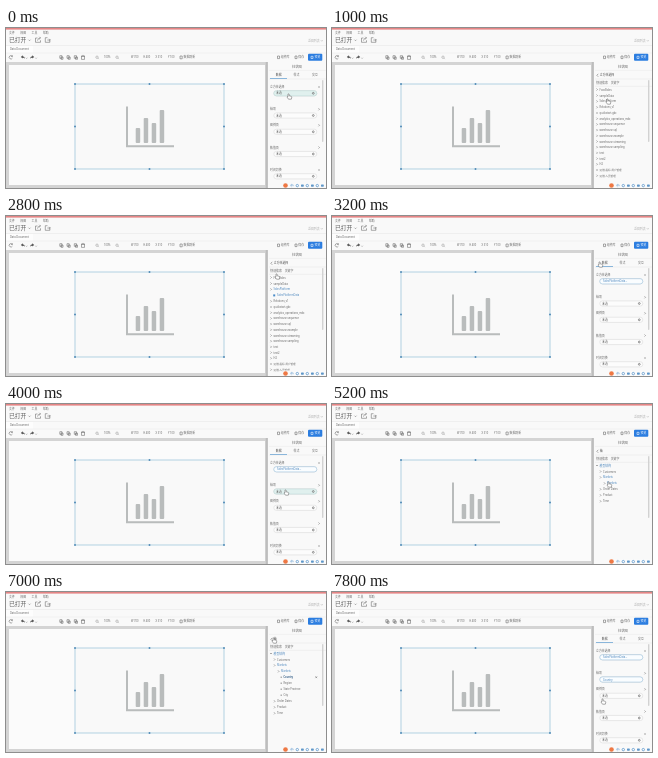
Animation of 320x160 px, one loop 8 s. Source, as an HTML page:

```html
<!DOCTYPE html>
<html lang="en">
<head>
<meta charset="utf-8">
<title>Chart data binding</title>
<style>
html, body { margin: 0; width: 100%; height: 100%; overflow: hidden; background: #f9f9f9; }
svg { display: block; width: 100%; height: 100%; }
text { font-family: "Noto Sans", "Noto Sans CJK SC", "Noto Sans CJK", sans-serif; font-size: 2.9px; fill: #666; dominant-baseline: central; }
.latin { font-size: 2.55px; }
.blue { fill: #4a85bd; }
.line { fill: none; stroke: #666; stroke-width: .55; }
.faint { stroke: #999; }
.rule { stroke: #e4e4e4; stroke-width: .5; }

[class*="at-"] { animation: 8s step-end infinite; }
.at-form { animation-name: form; }
.at-cubes { animation-name: cubes; }
.at-dims { animation-name: dims; }
.at-hover1 { animation-name: hover1; }
.at-hover2 { animation-name: hover2; }
.at-value1 { animation-name: value1; }
.at-value2 { animation-name: value2; }
.at-cube-open { animation-name: cubeOpen; }
.at-cube-shift { animation-name: cubeShift; }
.at-cube-sel text { animation: cubeSel 8s step-end infinite; }
.at-dim-open { animation-name: dimOpen; }
.at-dim-sel text { animation: dimSel 8s step-end infinite; }
.at-level-open { animation-name: levelOpen; }
.at-dim-shift { animation-name: dimShift; }
.at-chosen { animation-name: chosen; }
.at-tip { animation-name: tip; }
.at-cursor { animation-name: cursor; }

@keyframes form { 0%, 40%, 95% { opacity: 1 } 5%, 55% { opacity: 0 } }
@keyframes cubes { 0%, 40% { opacity: 0 } 5% { opacity: 1 } }
@keyframes dims { 0%, 95% { opacity: 0 } 55% { opacity: 1 } }
@keyframes hover1 { 0% { opacity: 1 } 5%, 100% { opacity: 0 } }
@keyframes hover2 { 0%, 55% { opacity: 0 } 50% { opacity: 1 } }
@keyframes value1 { 0% { opacity: 0 } 40% { opacity: 1 } }
@keyframes value2 { 0% { opacity: 0 } 95% { opacity: 1 } }
@keyframes cubeOpen { 0% { opacity: 0 } 17.5% { opacity: 1 } }
@keyframes cubeShift { 0% { transform: none } 17.5%, 100% { transform: translateY(6px) } }
@keyframes cubeSel { 0% { fill: #666 } 17.5%, 100% { fill: #4a85bd } }
@keyframes dimOpen { 0% { opacity: 0 } 60% { opacity: 1 } }
@keyframes dimSel { 0% { fill: #666 } 60%, 100% { fill: #4a85bd } }
@keyframes levelOpen { 0% { opacity: 0 } 70% { opacity: 1 } }
@keyframes dimShift { 0% { transform: none } 60% { transform: translateY(6px) } 70%, 100% { transform: translateY(30px) } }
@keyframes chosen { 0% { opacity: 0 } 75% { opacity: 1 } }
@keyframes tip { 0%, 82.5% { opacity: 0 } 75% { opacity: 1 } }
@keyframes cursor {
  0% { transform: translate(282px, 66px) }
  10% { transform: translate(280px, 68px) }
  12.5% { transform: translate(275px, 71px) }
  15%, 20% { transform: translate(267px, 73px) }
  22.5% { transform: translate(269px, 74px) }
  25%, 30% { transform: translate(277px, 78px) }
  32.5% { transform: translate(275px, 72px) }
  35% { transform: translate(270px, 58px) }
  37.5%, 40% { transform: translate(267px, 46px) }
  42.5% { transform: translate(268px, 52px) }
  45% { transform: translate(273px, 66px) }
  47.5% { transform: translate(277px, 81px) }
  50%, 52.5% { transform: translate(279px, 86px) }
  55% { transform: translate(277px, 84px) }
  57.5% { transform: translate(270px, 76px) }
  60% { transform: translate(267px, 73px) }
  65% { transform: translate(276px, 78px) }
  67.5% { transform: translate(274px, 79px) }
  70% { transform: translate(271px, 79px) }
  72.5% { transform: translate(277px, 83px) }
  75%, 77.5% { transform: translate(280px, 85px) }
  80% { transform: translate(279px, 83px) }
  82.5% { transform: translate(276px, 75px) }
  85% { transform: translate(271px, 60px) }
  87.5%, 95% { transform: translate(267px, 46px) }
  97.5%, 100% { transform: translate(270px, 107px) }
}
</style>
</head>
<body>
<svg id="stage" viewBox="0 0 320 160" preserveAspectRatio="none"></svg>
<script>
const label = (x, y, words, cls = "", style = "") =>
  `<text x="${x}" y="${y}" class="${cls}" style="${style}">${words}</text>`;
const box = (x, y, w, h, fill, extra = "") =>
  `<rect x="${x}" y="${y}" width="${w}" height="${h}" fill="${fill}" ${extra}/>`;
const path = (d, cls = "") => `<path d="${d}" class="line ${cls}"/>`;
const rule = (x, y, end) => `<path d="M${x} ${y}H${end}" class="rule"/>`;
const group = (cls, ...parts) => `<g class="${cls}">${parts.join("")}</g>`;
const latin = (x, y, words, cls = "") => label(x, y, words, "latin " + cls);

const arrow = (x, y, open) =>
  path(open ? `M${x} ${y - .5}l1 1 1-1` : `M${x + .5} ${y - 1}l1 1-1 1`);
const node = (x, y, words, open = false, cls = "") => arrow(x, y, open) + latin(x + 3.6, y, words, cls);

const topBar = () => box(0, 0, 320, 160, "#f9f9f9") + box(0, 0, 320, 1.6, "#e58585")
  + ["文件", "视图", "工具", "帮助"].map((s, i) => label(3 + i * 11.3, 4.7, s)).join("")
  + label(3, 12, "已打开", "", "font-size:5.8px;fill:#555") + path("M22.5 11.7l1 1 1-1")
  + path("M31.5 10h-2v4.3h5v-2M31.5 12.6q.4-2.6 3-2.6m-1.2-1.2 1.2 1.2-1.2 1.2")
  + path("M41.5 9.7h-2.2v4.6h4.6V12.5M41.3 12h3m-1.2-1.2 1.2 1.2-1.2 1.2")
  + label(302, 12.8, "返回列表", "", "fill:#aaa") + path("M315 12.4l.8.8.8-.8", "faint")
  + rule(0, 17.5, 320) + box(0, 18, 27, 7, "#fdfdfd") + latin(4, 21.2, "Data Document")
  + rule(0, 25, 320);

const zoomIcon = x => `<circle cx="${x}" cy="29.2" r="1.2" class="line faint"/>` + path(`M${x + .9} 30.1l1 1`, "faint");
const copyIcon = x => path(`M${x} 27.7h2.2v2.6H${x}zM${x + 1.2} 29h2v2.3h-2z`);

const toolbar = () => path("M6.3 28.3a1.7 1.7 0 1 0 .1 1.8M6.4 27.2v1.3H5.1")
  + '<path d="M14.8 28.9l2-1.6v1q2.2.1 2 2.6-.6-1.2-2-1.1v.7zM28.2 28.9l-2-1.6v1q-2.2.1-2 2.6.6-1.2 2-1.1v.7z" fill="#555"/>'
  + path("M20 29.8l.6.6.6-.6M29.5 29.8l.6.6.6-.6")
  + [53.8, 61, 68.3].map(copyIcon).join("") + path("M75.5 28.2h3v3.2h-3zM75 28.2h4M76.5 27.4h1")
  + zoomIcon(91) + latin(98, 29.4, "100%") + zoomIcon(111)
  + ["W 700", "H 400", "X 310", "Y 100"].map((s, i) => latin(125 + i * 12.3, 29.4, s)).join("")
  + path("M174 28h2.2v2.8H174z") + label(177.5, 29.4, "数据刷新")
  + path("M271.5 28h2v2.6h-2z") + label(274.8, 29.4, "组件库")
  + path("M289 28h2v2.6h-2z") + label(292.3, 29.4, "保存")
  + box(302, 25.8, 14.3, 6.9, "#2b7de0", 'rx="1"')
  + path("M305 28.3h2v2.2h-2z", "white") + label(308.5, 29.2, "预览", "", "fill:#fff");

const workspace = () => {
  const bars = [[129.7, 100], [137.7, 90], [145.7, 95], [153.7, 82]];
  const handles = [69, 143.5, 218].flatMap(x => [56, 98.5, 141].map(y => [x, y]))
    .filter(([x, y]) => x !== 143.5 || y !== 98.5);
  return box(0, 34, 262, 126, "#d4d4d4") + box(3, 37, 256, 120, "#fbfbfb")
    + box(259.7, 34, 2, 126, "#bdbdbd")
    + box(69, 56, 149, 85, "#f9f9f9", 'stroke="#93bfd8" stroke-width=".7"')
    + handles.map(([x, y]) => box(x - .8, y - .8, 1.6, 1.6, "#3f7eae")).join("")
    + '<path d="M121 78.5V118.3H168" fill="none" stroke="#b9bcbc" stroke-width="2"/>'
    + bars.map(([x, y]) => box(x, y, 4.5, 115 - y, "#b9bcbc", 'rx="1"')).join("");
};

const gear = y => `<circle cx="307.3" cy="${y}" r=".9" fill="none" stroke="#777" stroke-width=".8"/>`;
const pill = (y, stroke, fill) =>
  box(267.8, y - 2.6, 43, 5.2, fill, `rx="2.6" stroke="${stroke}" stroke-width=".5"`);
const filled = (y, words) => pill(y, "#8ab6d6", "#fafdff") + latin(271, y, words, "blue");

const form = () => {
  const fields = [["立方体选择", 59, 65.3], ["轴项", 81.3, 87.5], ["图例项", 97.3, 103.8], ["数值项", 119.5, 126], ["时间切换", 142, 148.3]];
  return group("at-form",
    label(269.8, 47.3, "数据", "", "fill:#444"), label(287.5, 47.3, "样式"), label(306, 47.3, "交互"),
    rule(263, 51, 320), box(264, 50.2, 17, .7, "#5c9bd0"),
    ...fields.map(([name, top, y]) => label(264, top, name) + arrow(312, top, false)
      + pill(y, "#d4d4d4", "#fcfcfc") + label(270, y, "未选") + gear(y)),
    group("at-hover1", pill(65.3, "#b5d3d0", "#e0f0ee"), label(270, 65.3, "未选"), gear(65.3)),
    group("at-hover2", pill(87.5, "#b5d3d0", "#e0f0ee"), label(270, 87.5, "未选"), gear(87.5)),
    group("at-value1", filled(65.3, "SalesPlatformData…")),
    group("at-value2", filled(87.5, "Country")));
};

const listHead = title => path("M266.3 45.8l-1.5 1.5 1.5 1.5") + label(267.8, 47.3, title, "", "fill:#444")
  + rule(263, 51, 320) + label(264.3, 55.1, "快速搜索") + label(278.7, 55.1, "关键字")
  + rule(263, 58.3, 320);

const cubeTree = () => {
  const rest = ["Relations_v1", "quickstart.gbc", "analytics_operations_mdx", "warehouse.sequence",
    "warehouse.sql", "warehouse.example", "warehouse.streaming", "warehouse.sampling", "test", "test2", "H2",
    "运维-指标-用户管理", "运维-人员管理"];
  return group("at-cubes", listHead("立方体选择"),
    node(264, 61.5, "FoodSales"), node(264, 67.5, "sampleData"),
    group("at-cube-sel", node(264, 73.4, "SalesPlatform")),
    group("at-cube-open", box(267.2, 78.4, 2, 2, "#4a8cc8"), latin(271, 79.4, "SalesPlatformData", "blue")),
    group("at-cube-shift", ...rest.map((s, i) => node(264, 79.3 + i * 5.7, s))));
};

const dimTree = () => group("at-dims", listHead("轴"),
  arrow(264, 61.5, true), label(267.5, 61.5, "模型结构", "blue"),
  node(267.5, 67.5, "Customers"),
  group("at-dim-sel", node(267.5, 73.4, "Markets")),
  group("at-dim-open", node(271.5, 79.4, "Markets", false, "blue")),
  group("at-level-open",
    ...["Country", "Region", "State Province", "City"].map((s, i) =>
      box(274.6, 84.6 + i * 6, 1.2, 1.2, "#888") + latin(277.5, 85.2 + i * 6, s))),
  group("at-chosen", latin(277.5, 85.2, "Country", "blue"),
    path("M309.4 84.4l1.7 1.7m0-1.7-1.7 1.7")),
  group("at-tip", box(277, 88.5, 11.5, 5, "#e8eef5", 'stroke="#8a9aaa" stroke-width=".5"'),
    latin(278, 91, "Country")),
  group("at-dim-shift", ...["Order Dates", "Product", "Time"].map((s, i) => node(267.5, 79.3 + i * 6, s))));

const panel = () => box(262, 34, 58, 126, "#f9f9f9")
  + label(286, 38.2, "柱状图", "", "font-size:3.3px") + rule(263, 42.3, 320)
  + form() + cubeTree() + dimTree() + box(316, 52, 1.4, 62, "#d2d2d2", 'rx=".7"');

const inputBar = () => box(276.5, 154.6, 43.5, 5.4, "#fafafa")
  + '<circle cx="279.5" cy="157.5" r="2.3" fill="#ee7844"/>'
  + label(284.3, 157.6, "中", "", "fill:#3d82c4;font-size:3.4px")
  + [290, 295, 300, 305, 310, 315].map((x, i) =>
    i % 2 ? box(x, 156.5, 2.8, 2.2, "#5f97c9", 'rx=".6"')
      : `<circle cx="${x + 1.3}" cy="157.6" r="1.2" fill="none" stroke="#4a8cc8" stroke-width=".7"/>`).join("");

const pointer = () => group("at-cursor",
  '<path d="M0 0q.8-.5 1.1.3v1.5l2 .5q.8.3.6 1.2l-.4 1.7H.5L-.9 3.1q0-.8.9-.3z" fill="#fff" stroke="#444" stroke-width=".45"/>');

document.getElementById("stage").innerHTML =
  [topBar, toolbar, workspace, panel, inputBar, pointer].map(draw => draw()).join("");
</script>
<style>.white { stroke: #fff; }</style>
</body>
</html>
```
